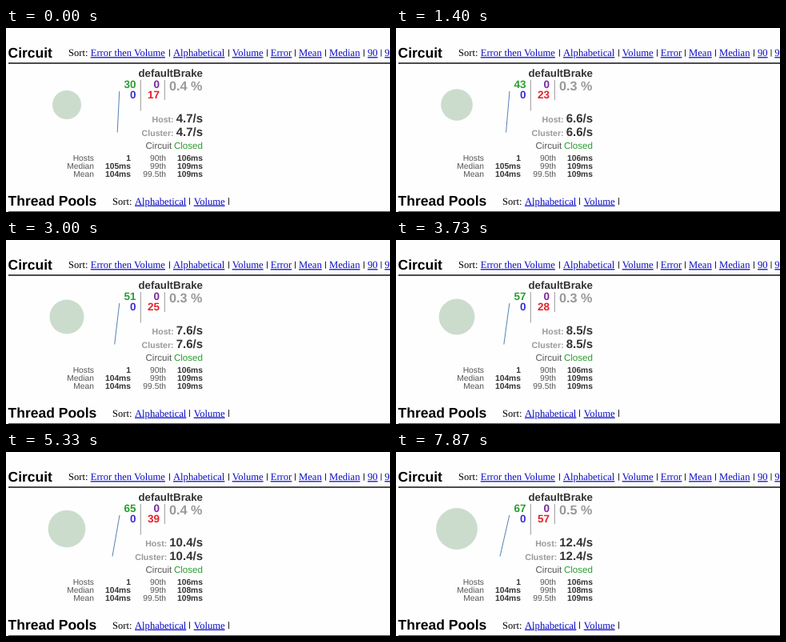
Recreate the animation shown at these times as an HTML page. Size 480 by 230 pixels, loop 8 s.

```html
<!DOCTYPE html>
<html>
<head>
<meta charset="utf-8">
<title>Circuit dashboard</title>
<style>
html, body { margin: 0; width: 100%; height: 100%; overflow: hidden; background: #fefefe; }
svg { display: block; width: 480px; height: 230px; }
text {
  font-family: "Liberation Sans", Arial, sans-serif;
  fill: #333;
  white-space: pre;
  text-rendering: geometricPrecision;
}
.b { font-weight: bold; }
.end { text-anchor: end; }
.head { font-size: 17.5px; font-weight: bold; fill: #000; }
.sort { font: 12.6px "Liberation Serif", "Times New Roman", serif; fill: #000; }
.link { fill: #0a0ac4; text-decoration: underline; }
.count { font-size: 13.5px; }
.small { font-size: 10.3px; }
.thin { fill: #555; }
.key { font-size: 10.6px; }
.rate { font-size: 15px; }
.gray { fill: #999; }
</style>
</head>
<body>
<svg id="stage" viewBox="0 0 480 230" xmlns="http://www.w3.org/2000/svg"></svg>
<script>
const stage = document.getElementById("stage");
const LOOP = 8000, TICK = 1000, LEAD = 870;
const GREEN = "#2a9d2f";

// One entry per poll
const success = [30, 37, 43, 51, 57, 61, 65, 66, 67];
const failed = [17, 20, 23, 25, 28, 34, 39, 48, 57];
const percent = [4, 3, 3, 3, 3, 4, 4, 4, 5];
const radius = [18, 19, 20, 21.5, 22.4, 23, 23.7, 24.9, 25.9];

function add(tag, attrs, parent = stage) {
  const node = document.createElementNS("http://www.w3.org/2000/svg", tag);
  for (const key in attrs) node.setAttribute(key, attrs[key]);
  parent.appendChild(node);
  return node;
}

function label(x, y, cls, str, fill) {
  const node = add("text", { x, y, class: cls });
  node.textContent = str;
  if (fill) node.style.fill = fill;
  return node;
}

function rule(x1, y1, x2, y2, stroke, width) {
  return add("line", { x1, y1, x2, y2, stroke, "stroke-width": width });
}

function sortRow(y, start, links, pipes) {
  label(start, y, "sort", "Sort:");
  for (const [x, name] of links) label(x, y, "sort link", name);
  for (const x of pipes) rule(x, y - 8.5, x, y + 0.5, "#222", 1);
}

label(2.5, 36.7, "head", "Circuit");
sortRow(35.2, 78, [[105.7, "Error then Volume"], [209, "Alphabetical"], [282.7, "Volume"],
  [330.7, "Error"], [366, "Mean"], [404, "Median"], [452, "90"], [473.3, "99"]],
  [204.5, 278.5, 326.5, 361.5, 399.5, 447.5, 469]);
rule(3, 44, 480, 44, "#111", 1.5);

label(2.5, 222.4, "head", "Thread Pools");
sortRow(220.6, 133, [[161, "Alphabetical"], [234.7, "Volume"]], [229.5, 278.5]);
rule(3, 230, 480, 230, "#111", 1.7);

const disc = add("circle", { cx: 76, cy: 96, fill: "#cbdccc" });
const spark = rule(142, 79, 139, 130.5, "#5581b4", 1);

label(246, 61, "b end", "defaultBrake").style.fontSize = "13.3px";
const okCount = label(162.5, 75, "b end count", "", GREEN);
label(162.5, 88, "b end count", "0", "#3a30cf");
label(192, 75, "b end count", "0", "#7a2b9c");
const badCount = label(192, 88, "b end count", "", "#e3202c");
rule(168.3, 65, 168.3, 103.5, "#999", 1);
rule(198.3, 65, 198.3, 90, "#999", 1);
const share = label(245.3, 77.5, "b end gray", "");
share.style.fontSize = "16.2px";

function rateRow(y, name) {
  const row = label(246, y, "b end", "");
  const key = add("tspan", { class: "key gray" }, row);
  key.textContent = name;
  return add("tspan", { class: "rate", dx: 3 }, row);
}
const rates = [rateRow(118.2, "Host:"), rateRow(135.2, "Cluster:")];

label(207.3, 150.7, "end thin", "Circuit").style.fontSize = "11.6px";
label(246, 150.7, "end", "Closed", GREEN).style.fontSize = "11.6px";

const cells = [
  ["Hosts", "1", "90th", "106ms"],
  ["Median", "", "99th", ""],
  ["Mean", "104ms", "99.5th", "109ms"]
].map((row, i) => row.map((str, j) =>
  label([110, 156, 200, 246][j], 166 + i * 9.8, "small end " + (j % 2 ? "b" : "thin"), str)));
const median = cells[1][1], p99 = cells[1][3];

const ease = u => u < 0.5 ? 4 * u ** 3 : 1 - 4 * (1 - u) ** 3;

function set(node, str) {
  if (node.textContent !== str) node.textContent = str;
}

function draw(t) {
  const clock = (t + LEAD) / TICK;
  const k = Math.floor(clock), phase = clock - k;

  set(okCount, String(success[k]));
  set(badCount, String(failed[k]));
  set(share, "0." + percent[k] + " %");
  const rate = ((success[k] + failed[k]) / 10).toFixed(1) + "/s";
  for (const node of rates) set(node, rate);
  set(median, k < 3 ? "105ms" : "104ms");
  set(p99, k < 5 ? "109ms" : "108ms");

  const from = radius[Math.max(0, k - 1)];
  disc.setAttribute("r", from + (radius[k] - from) * ease(Math.min(1, phase / 0.4)));

  // The trace slides left as new samples arrive
  spark.setAttribute("x1", 142.1 - 0.4 * phase);
  spark.setAttribute("x2", 139.2 - 1.17 * t / 1000);
}

const begin = performance.now();
function frame() {
  draw((performance.now() - begin) % LOOP);
  requestAnimationFrame(frame);
}
frame();
</script>
</body>
</html>
```
